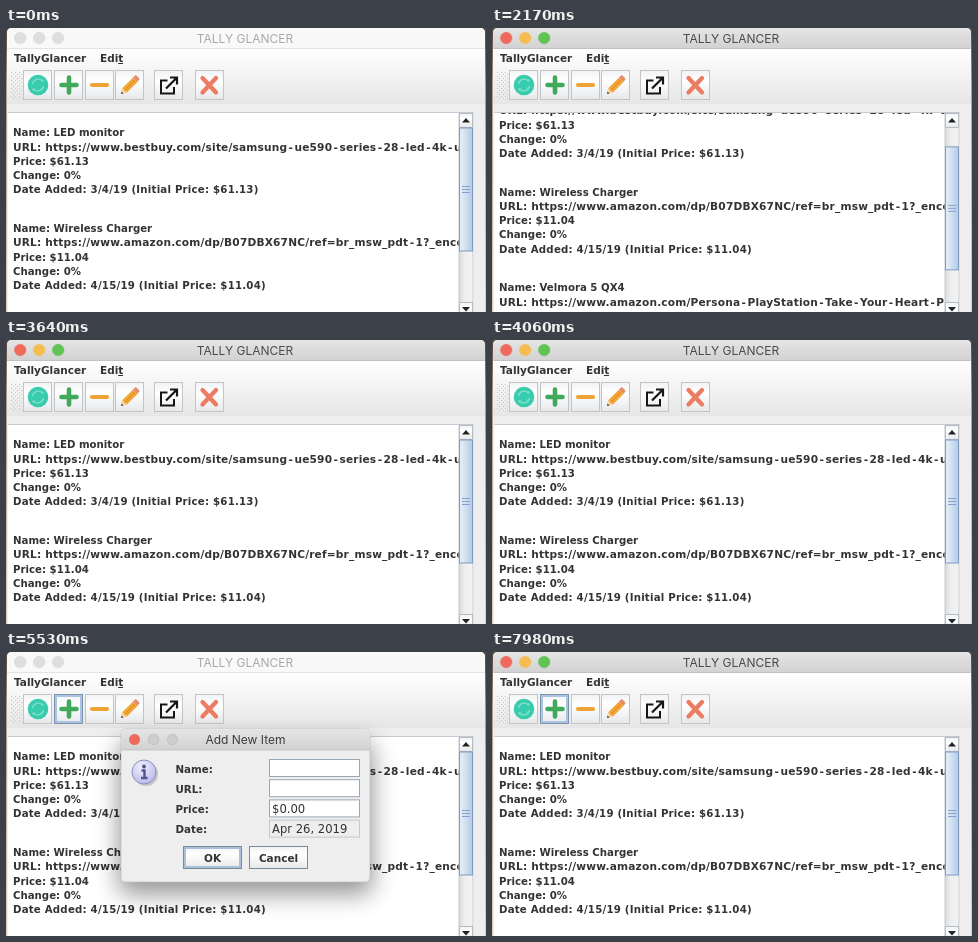
These frames come from a looping animation (480x284 px, 8000 ms). An HTML page:

```html
<!DOCTYPE html>
<html lang="en">
<head>
<meta charset="utf-8">
<title>Tally Glancer</title>
<style>
  html, body { margin: 0; width: 100%; height: 100%; overflow: hidden; background: #eee; }
  svg { display: block; width: 480px; height: 284px; }
  text { white-space: pre; }
  .bold { font-family: "DejaVu Sans", sans-serif; font-weight: 700; fill: #333; }
  .plain { font-family: "DejaVu Sans", sans-serif; fill: #333; }
  .title { font-family: Inter, sans-serif; text-anchor: middle; }
</style>
</head>
<body>
<svg viewBox="0 0 480 284" xmlns="http://www.w3.org/2000/svg">
  <defs>
    <linearGradient id="desk" x2="0" y2="1"><stop stop-color="#54443a"/><stop offset=".2" stop-color="#b49a86"/><stop offset="1" stop-color="#e0d0c2"/></linearGradient>
    <linearGradient id="bar" x2="0" y2="1"><stop stop-color="#e6e5e6"/><stop offset="1" stop-color="#d3d2d3"/></linearGradient>
    <linearGradient id="menu" x2="0" y2="1"><stop stop-color="#fff"/><stop offset="1" stop-color="#e6e6e6"/></linearGradient>
    <linearGradient id="face" x2="0" y2="1"><stop stop-color="#f1f2f3"/><stop offset=".35" stop-color="#fff"/><stop offset="1" stop-color="#e6e8ea"/></linearGradient>
    <linearGradient id="thumb"><stop stop-color="#e6eff8"/><stop offset=".4" stop-color="#d5e3f2"/><stop offset="1" stop-color="#b2cbe4"/></linearGradient>
    <linearGradient id="track"><stop stop-color="#dadada"/><stop offset=".4" stop-color="#eee"/><stop offset="1" stop-color="#f4f4f4"/></linearGradient>
    <radialGradient id="orb" cx=".4" cy=".3" r=".8"><stop stop-color="#f1f1ff"/><stop offset="1" stop-color="#b3b3e6"/></radialGradient>
    <clipPath id="view"><rect x="2" y="85" width="451" height="199"/></clipPath>
    <filter id="shade" x="-30%" y="-30%" width="160%" height="170%"><feGaussianBlur stdDeviation="12"/></filter>
  </defs>

  <rect width="480" height="284" fill="url(#desk)"/>
  <path d="M1 284V5Q1 0 6 0H474Q479 0 479 5V284Z" fill="#eee"/>
  <path id="titleBar" d="M1 20V5Q1 0 6 0H474Q479 0 479 5V20Z"/>
  <g id="dots"></g>
  <text id="mainTitle" class="title" x="239" y="14.7" font-size="12">TALLY GLANCER</text>

  <rect x="1" y="20" width="478" height="56" fill="url(#menu)"/>
  <path id="titleEdge" d="M1 20.5H479"/>
  <g class="bold" font-size="10.5">
    <text x="8" y="34">TallyGlancer</text>
    <text x="94" y="34">Edit</text>
  </g>
  <path d="M112 35.5H117" stroke="#333"/>
  <g id="grip" fill="#c8c8c8"></g>
  <g id="tools"></g>

  <rect x="2" y="84" width="466" height="200" fill="#fff"/>
  <path d="M2 84.5H468" stroke="#c3cad1"/>
  <g clip-path="url(#view)"><g id="list" class="bold"></g></g>

  <rect x="453" y="85" width="14" height="199" fill="url(#track)" stroke="#c4c9ce"/>
  <g fill="url(#face)" stroke="#b5bcc4">
    <rect x="453.5" y="85.5" width="13" height="14"/>
    <rect x="453.5" y="274.5" width="13" height="14"/>
  </g>
  <path d="M456 94.5L460 90L464 94.5ZM456 279L460 283.5L464 279Z" fill="#222"/>
  <g id="thumbBox">
    <rect x="453.5" y="100" width="13" height="123" fill="url(#thumb)" stroke="#7f9cc4"/>
    <path d="M456 158.5H464M456 161.5H464M456 164.5H464" stroke="#86a0cc"/>
  </g>

  <g id="dialog">
    <rect x="113" y="90" width="253" height="152" rx="8" fill="#000" opacity=".42" filter="url(#shade)"/>
    <rect x="115" y="77" width="249" height="153" rx="4" fill="#eee" stroke="#bdbdbd" stroke-width=".7"/>
    <path d="M115 98V81Q115 77 119 77H360Q364 77 364 81V98Z" fill="url(#bar)"/>
    <path d="M115 98H364" stroke="#bbb" stroke-width=".7"/>
    <circle cx="128.5" cy="87.5" r="5.5" fill="#ee6a5b"/>
    <g fill="#cfcdcf" stroke="#bab8ba" stroke-width=".7">
      <circle cx="147.5" cy="87.5" r="5.2"/><circle cx="166.5" cy="87.5" r="5.2"/>
    </g>
    <text class="title" x="239.5" y="92" font-size="12" fill="#3c3c3c">Add New Item</text>
    <circle cx="140" cy="122" r="12" fill="#999" opacity=".5"/>
    <circle cx="138" cy="120" r="12" fill="url(#orb)" stroke="#8f8fc4"/>
    <circle cx="138" cy="114.5" r="2" fill="#55558c"/>
    <path d="M135.5 118.5H138.5V126M135 126H141.5" fill="none" stroke="#55558c" stroke-width="2.4"/>
    <g id="fields"></g>
    <rect x="177.5" y="194.5" width="58" height="22" fill="url(#face)" stroke="#7a8a99"/>
    <rect x="179" y="196" width="55" height="19" fill="none" stroke="#a9c0da" stroke-width="2"/>
    <text class="bold" x="206.5" y="210" font-size="10.5" text-anchor="middle">OK</text>
    <rect id="cancel" x="243.5" y="194.5" width="58" height="22" stroke="#7a8a99"/>
    <rect id="focus" x="250.5" y="198.5" width="44" height="14" fill="none" stroke="#92aed1"/>
    <text class="bold" x="272.5" y="210" font-size="10.5" text-anchor="middle">Cancel</text>
  </g>
</svg>
<script>
const LOOP = 8000, STEP = 70;
const MAX_SCROLL = 87, THUMB_RATE = .52;
const $ = id => document.getElementById(id);
const clamp = x => Math.max(0, Math.min(1, x));
const ramp = (t, a, b) => clamp((t - a) / (b - a));
const smooth = p => p * p * (3 - 2 * p);
const within = (t, a, b) => t >= a && t < b;

const items = [
  ['LED monitor', 'https://www.bestbuy.com/site/samsung-ue590-series-28-led-4k-u', '$61.13', '3/4/19'],
  ['Wireless Charger', 'https://www.amazon.com/dp/B07DBX67NC/ref=br_msw_pdt-1?_enco', '$11.04', '4/15/19'],
  ['Velmora 5 QX4', 'https://www.amazon.com/Persona-PlayStation-Take-Your-Heart-Pre', '$19.99', '4/15/19']
];

// Hyphens sit in a wider cell than the font gives them.
const airy = s => s.replace(/-/g, '<tspan dx="1.3" letter-spacing="1.5">-</tspan>');

const lineOf = (text, y, size = 10.2, gap = 0) =>
  `<text x="7" y="${y}" font-size="${size}" letter-spacing="${gap}">${text}</text>`;

$('list').innerHTML = items.map(([name, url, price, date], n) => {
  const y = i => 108.3 + n * 95.7 + i * 14.25;
  return lineOf(`Name: ${name}`, y(0))
    + lineOf(`URL: ${airy(url)}`, y(1), 10.6, .18)
    + lineOf(`Price: ${price}`, y(2))
    + lineOf('Change: 0%', y(3))
    + lineOf(`Date Added: ${date} (Initial Price: ${price})`, y(4), 10.2, .22);
}).join('');

const lights = ['#ee6a5b', '#f5bd4f', '#61c354'];
$('dots').innerHTML = lights.map((c, i) =>
  `<circle cx="${14.2 + i * 19}" cy="10" r="5.8" stroke-width=".5"/>`).join('');

let bumps = '';
for (let y = 0; y < 14; y++)
  for (let x = 0; x < 3; x++)
    bumps += `<rect x="${5 + x * 4 + y % 2 * 2}" y="${44 + y * 2}" width="1" height="1"/>`;
$('grip').innerHTML = bumps;

const icons = [
  [17, `<circle cx="15" cy="15" r="10.3" fill="#38cbad"/>
    <path d="M9.5 14A6 6 0 0 1 19.5 10.8M20.5 16A6 6 0 0 1 10.5 19.2" fill="none" stroke="#7fe0c9" stroke-width="1.4"/>
    <path d="M17.5 11.8H20.5V8.8ZM12.500 18.200H9.500V21.200Z" fill="#7fe0c9"/>`],
  [48, '<path d="M15 7.5V22.5M7.5 15H22.5" stroke="#3fa95c" stroke-width="4.6" stroke-linecap="round"/>'],
  [79, '<path d="M7 15H22" stroke="#eda436" stroke-width="4.2" stroke-linecap="round"/>'],
  [109, `<path d="M6 24L7.5 18L18 7.5L22.5 12L12 22.5Z" fill="#f2a638"/>
    <path d="M18 7.5L20 5.500Q21 5 22 6L24 8Q25 9 24 10L22.500 12Z" fill="#e88a72"/>
    <path d="M6 24L7.5 18L12 22.5Z" fill="#f6d3a0"/><path d="M6 24L6.6 21.6L8.4 23.4Z" fill="#444"/>
    <path d="M9.500 20.500L20.500 9.500" stroke="#d98716"/>`],
  [148, `<path d="M13.5 10.5H7V23.5H20V17" fill="none" stroke="#161616" stroke-width="2"/>
    <path d="M12 18.5L22 8.500M16 7.500H23V14.500" fill="none" stroke="#161616" stroke-width="2.2"/>`],
  [189, '<path d="M7.500 8L21 22.500M21 8L7.500 22.500" stroke="#ec7b63" stroke-width="4.300" stroke-linecap="round"/>']
];
$('tools').innerHTML = icons.map(([x, art]) =>
  `<g transform="translate(${x} 42)">
    <rect class="face" x=".5" y=".5" width="28" height="29" fill="url(#face)"/>
    <rect class="glow" x="2" y="2" width="25" height="26" fill="none" stroke="#a9c5e3" stroke-width="2"/>${art}</g>`).join('');
const glows = [...document.querySelectorAll('.glow')];
const faces = [...document.querySelectorAll('.face')];

$('fields').innerHTML = [['Name:', ''], ['URL:', ''], ['Price:', '$0.00'], ['Date:', 'Apr 26, 2019']]
  .map(([label, value], i) => {
    const y = 107.5 + i * 20.2, off = i === 3;
    return `<text class="bold" x="169.5" y="${y + 13}" font-size="10.3">${label}</text>
      <rect x="263.5" y="${y}" width="90" height="17" fill="${off ? '#eee' : '#fff'}" stroke="${off ? '#c2c8ce' : '#9aa7b4'}"/>
      <text class="plain" x="266" y="${y + 13}" font-size="11.6">${value}</text>`;
  }).join('');

function setActive(on) {
  $('titleBar').setAttribute('fill', on ? 'url(#bar)' : '#f9f9f9');
  $('titleEdge').setAttribute('stroke', on ? '#c2c2c2' : '#e4e4e4');
  $('mainTitle').setAttribute('fill', on ? '#4a4a4a' : '#a8a8a8');
  [...$('dots').children].forEach((dot, i) => {
    dot.setAttribute('fill', on ? lights[i] : '#dedede');
    dot.setAttribute('stroke', on ? lights[i] : '#d2d2d2');
  });
}

function draw(time) {
  const t = Math.floor(time / STEP) * STEP;
  setActive(within(t, 1890, 5180) || t >= 7000);

  const scroll = MAX_SCROLL * (smooth(ramp(t, 1890, 2520)) - smooth(ramp(t, 2590, 3290)));
  $('list').setAttribute('transform', `translate(0 ${-scroll})`);
  $('thumbBox').setAttribute('transform', `translate(0 ${scroll * THUMB_RATE})`);

  const hover = t >= 4760;
  glows.forEach((g, i) => g.setAttribute('opacity', i === 1 && hover ? 1 : 0));
  faces.forEach((f, i) => f.setAttribute('stroke', i === 1 && hover ? '#7f93a8' : '#c2c4c7'));
  faces[1].setAttribute('fill', within(t, 5040, 5180) ? '#b8cfe5' : 'url(#face)');

  const shown = ramp(t, 5110, 5320) * (1 - ramp(t, 6930, 7140));
  $('dialog').setAttribute('opacity', shown);
  const pressed = t >= 6720;
  $('cancel').setAttribute('fill', pressed ? '#b8cfe5' : 'url(#face)');
  $('focus').setAttribute('opacity', pressed ? 1 : 0);
}

function tick() {
  draw(performance.now() % LOOP);
  requestAnimationFrame(tick);
}
tick();
</script>
</body>
</html>
```
